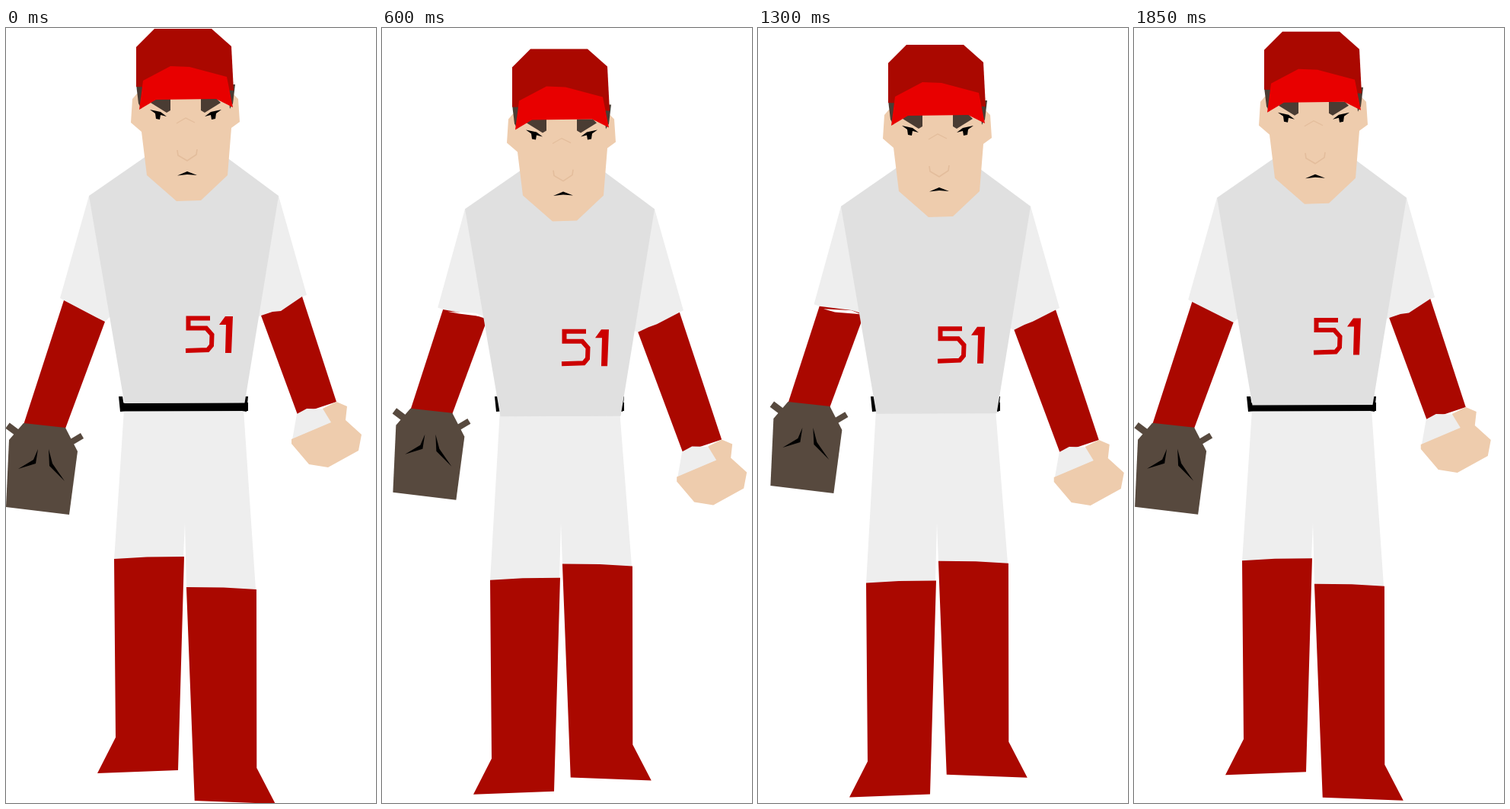
An HTML page with a canvas that plays this animation: 486x1016 px, repeating every 1900 ms.

```html
<!DOCTYPE html>
<html lang="en">
<head>
<meta charset="utf-8">
<title>Ballplayer 51</title>
<style>
html, body { margin: 0; width: 100%; height: 100%; overflow: hidden; background: #fff; }
canvas { display: block; width: 486px; height: 1016px; }
</style>
</head>
<body>
<canvas id="stage" width="486" height="1016" role="img" aria-label="Ballplayer with number 51"></canvas>
<script>
const ctx = document.getElementById('stage').getContext('2d');
const LOOP = 1900, CYCLE = LOOP / 2, STEP = 50;
const RED = '#aa0800', BRIGHT = '#e80000', NUMBER = '#cc0000', CLOTH = '#eee', JERSEY = '#e0e0e0',
      SKIN = '#eeccad', SHADE = '#e3bd9c', GLOVE = '#57493e', HAIR = '#4a3c33', BLACK = '#000';

// Linear rise, hold at the peak, linear fall; slopes in px per ms.
const bob = (t, peak, rise, fall, end = CYCLE) =>
  Math.max(0, Math.min(peak, rise * t, fall * (end - t)));

function trace(points) {
  ctx.beginPath();
  for (let i = 0; i < points.length; i += 2) ctx.lineTo(points[i], points[i + 1]);
}

function poly(color, ...points) {
  trace(points);
  ctx.fillStyle = color;
  ctx.fill();
}

function line(color, width, ...points) {
  trace(points);
  ctx.strokeStyle = color;
  ctx.lineWidth = width;
  ctx.stroke();
}

function within(matrix, draw) {
  ctx.save();
  ctx.transform(...matrix);
  draw();
  ctx.restore();
}

const shifted = (x, y, draw) => within([1, 0, 0, 1, x, y], draw);

function mirrored(axis, draw) {
  draw();
  within([-1, 0, 0, 1, 2 * axis, 0], draw);
}

function drawSock() {
  poly(RED, 142, 696, 185, 693.5, 234, 693, 226, 973, 120, 977, 144, 930);
}

function drawLegs(left, right) {
  poly(CLOTH, 155, 500, 312, 500, 328, 736 - right, 237, 735 - right, 235, 648,
    233, 694 + left, 142, 697 + left);
  shifted(0, left, drawSock);
  within([-1, 0, .01, 1, 464, 40 - right], drawSock);
  line(BLACK, 11, 150, 497, 318, 496.5);
  mirrored(233, () => poly(BLACK, 148, 483, 153, 483, 156, 502, 150, 503));
}

function drawGloveArm(lift) {
  const dx = .52 * lift, dy = -1.32 * lift;
  const outer = [76 + .15 * lift, 357 - .19 * lift];
  const crease = [118 + .15 * lift, 379 - .72 * lift];
  const inner = [130 + .3 * lift, 385 - .74 * lift];
  poly(CLOTH, 109, 220, 71 + .08 * lift, 354 - .17 * lift, ...outer, ...inner, 137, 378, 130, 260);
  poly(RED, ...outer, ...crease, ...inner, 78 + dx, 525 + dy, 23 + dx, 520 + dy);
  const gap = Math.max(0, lift - 24);
  if (gap) poly('#fff', 86, 354.5, 123, 356.5, 135, 361.5, 101, 355.5 + .45 * gap);
}

function drawGlove() {
  line(GLOVE, 9, 2, 521, 18, 533);
  line(GLOVE, 8, 84, 544, 100, 534.5);
  poly(GLOVE, 4, 540, 23, 518, 78, 524, 94, 555, 83, 638, 0, 628);
  poly(BLACK, 16, 578, 36, 566, 42, 552, 39, 571);
  poly(BLACK, 56, 552, 61, 571, 77, 594, 57, 574);
}

function drawBareArm(drop) {
  const dx = .4 * drop, dy = 1.06 * drop;
  const inner = [335 + .04 * drop, 377 + .15 * drop], outer = [389 + .06 * drop, 352 + .11 * drop];
  poly(CLOTH, 358, 220, 395 + .03 * drop, 350 + .1 * drop, ...outer, 361, 372, ...inner, 329, 379, 338, 260);
  poly(RED, ...inner, 350, 372 + .1 * drop, 361, 371, ...outer, 434 + dx, 490 + dy, 383 + dx, 507 + dy);
}

function drawHand() {
  poly(CLOTH, 382, 506, 395, 499, 417, 499.5, 428, 518, 376, 540);
  poly(SKIN, 375, 539, 427, 517, 416, 499, 434, 490, 448, 496, 446, 514, 467, 533,
    463, 554, 423, 576, 398, 572, 375, 545);
}

function drawTorso() {
  poly(JERSEY, 109, 220, 190, 164, 285, 166, 358, 220, 313.5, 491.5, 155.5, 492);
  line(NUMBER, 6, 268, 380.5, 239.5, 380.5, 239.5, 393.5, 263, 393.5, 270.5, 402, 270, 416, 265, 422, 236, 423);
  poly(NUMBER, 280, 389, 288, 378, 298, 378, 296, 426, 288, 426, 289, 389);
}

function drawEye() {
  poly(BLACK, 189, 107, 203, 110, 211, 116, 203, 114, 202, 120, 197, 119, 196, 112);
}

function drawHead(lidScale) {
  poly(SKIN, 172, 86, 166, 93, 164, 124, 178, 136, 185, 193, 224, 227, 256, 226, 291, 193,
    296, 131, 307, 123, 305, 93, 298, 86);
  mirrored(236, () => {
    poly(HAIR, 171, 74, 181, 74, 178, 106, 174, 99);
    poly(HAIR, 190, 98, 195, 93, 216, 93, 216, 108, 211, 111);
    within([1, 0, 0, lidScale, 0, 116 * (1 - lidScale)], drawEye);
  });
  poly(RED, 171, 25, 195, 1, 270, 1, 296, 24, 299, 82, 240, 80, 171, 77);
  poly(BRIGHT, 180, 69, 216, 50, 241, 51, 290, 64, 298, 104, 276, 93, 197, 94, 175, 107);
  line(SHADE, 1.2, 224, 125, 236, 118, 248, 124);
  line(SHADE, 1.6, 225, 160, 226, 167, 238, 174, 250, 166, 251, 159);
  poly(BLACK, 225, 193.5, 238, 188, 251, 193, 238, 192);
}

function frame(now) {
  const t = Math.floor(now % LOOP / STEP) * STEP, phase = t % CYCLE;
  const head = bob(phase, 27, .06, .076);
  const left = bob(phase, 37, .09, .085, 925);
  const right = bob(phase, 35, .098, .087);
  const body = .65 * head;
  const squinting = t >= 850 && t < 1250;

  ctx.clearRect(0, 0, 486, 1016);
  drawLegs(left, right);
  shifted(0, body, () => {
    drawGloveArm(left);
    drawBareArm(right);
    drawTorso();
    shifted(.52 * left, -1.32 * left, drawGlove);
    shifted(.4 * right, 1.06 * right, drawHand);
  });
  shifted(0, head, () => drawHead(squinting ? .7 : 1));
}

let start;
function tick(now) {
  start ??= now;
  frame(now - start);
  requestAnimationFrame(tick);
}
frame(0);
requestAnimationFrame(tick);
</script>
</body>
</html>
```
